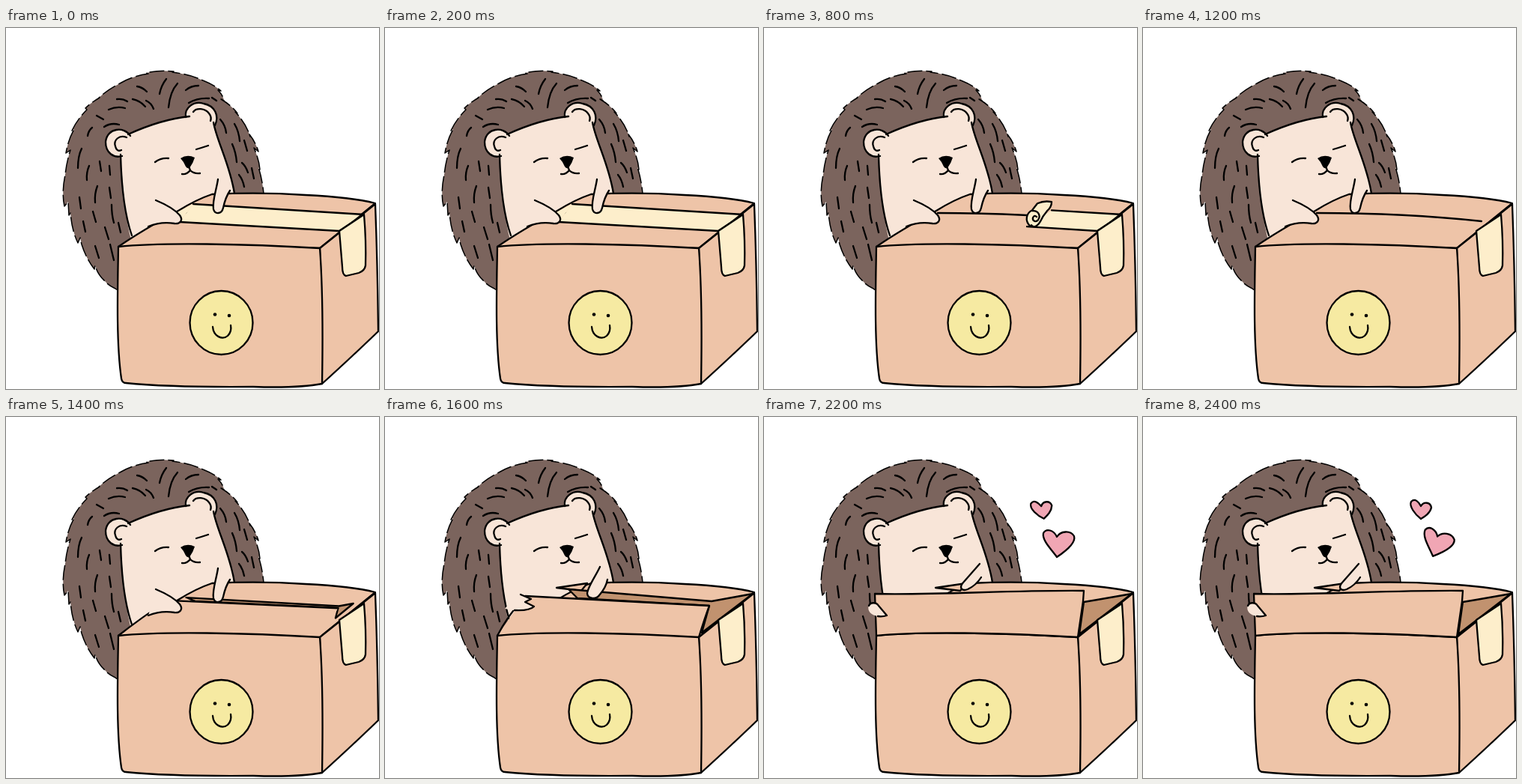
These frames come from a looping animation (498x482 px, 2600 ms). An HTML page:

```html
<!DOCTYPE html>
<html lang="en">
<head>
<meta charset="utf-8">
<title>Hedgehog opens a box</title>
<style>
  html, body { margin: 0; width: 100%; height: 100%; overflow: hidden; background: #fff; }
  svg { display: block; width: 100%; height: 100%; }
  .line { fill: none; stroke: #000; stroke-width: 2.3; stroke-linecap: round; stroke-linejoin: round; }
  .rim { stroke: #000; stroke-width: 1.5; stroke-dasharray: 20 5; stroke-linejoin: round; }
  .fur { fill: #7b645d; }
  .skin { fill: #f8e5d8; }
  .card { fill: #eec4a8; }
  .inside { fill: #c1926f; }
  .tape { fill: #fdeecb; }
  .heart { fill: #f0a6b4; }
  .smile { fill: #f6eaa2; }
</style>
</head>
<body>
<svg viewBox="0 0 498 482" preserveAspectRatio="none">
  <path class="rim fur" d="M152 352L146 348Q137 344 132 338Q122 329 119 317L118 322Q107 308 101 289L99 280L96 287Q88 271 86 247L84 250L83 232L78 238Q74 220 79 196Q81 178 86 163L80 167Q83 149 91 135L88 137Q95 122 108 109L106 107Q113 100 125 93L122 95Q134 83 152 74Q169 64 190 61L187 60Q204 56 224 58L222 59Q246 62 263 70Q278 76 287 84L283 83Q290 90 291 97L287 95Q302 104 309 114L306 112Q321 128 326 145L325 142Q333 152 337 165L331 160Q338 176 339 189L337 186Q342 201 344 221L300 290Z"/>
  <g class="line">
    <path d="M214 68Q207 77 205 88M229 74Q219 85 217 106M175 78Q182 79 188 85M148 95Q156 94 162 98M169 95Q179 97 186 105M187 97Q194 100 197 108M137 109Q148 104 159 107M131 132Q140 126 151 129M240 83Q247 77 257 77M244 100Q256 93 271 94M121 117L130 122M115 133Q110 137 109 144M275 93L281 97"/>
    <path d="M286 122Q293 130 294 140M305 128Q311 138 312 151M302 155Q307 166 308 179M318 150L322 164M315 180Q320 184 323 193M328 187L331 201M311 196Q316 202 318 212M101 161Q96 171 96 187M125 178L127 191M111 184Q107 193 108 203M138 184L139 196M122 211Q118 221 119 233M138 213L140 227M98 226L100 241M141 236Q141 249 144 260M116 245L120 259M103 258L106 272M132 266L137 282M150 260L153 273M119 291L124 307M139 289L144 310"/>
  </g>
  <path class="skin" d="M163 142C187 131 216 121 243 119L276 125C280 150 299 182 304 220L300 245L200 290L168 287C158 250 156 210 153 168Z"/>
  <path class="line skin" d="M166 144C158 131 135 133 133 152C133 167 144 174 155 171"/>
  <path class="line skin" d="M240 119C238 106 251 97 264 101C279 104 285 117 279 130"/>
  <path class="line" d="M161 146C151 142 143 150 146 158C147 163 150 165 154 163M250 112C254 106 266 107 271 114Q275 119 273 124M163 142C187 131 216 121 245 118M153 169C154 210 158 248 168 277M277 126C281 150 299 182 305 221"/>
  <path class="line" d="M199 179Q207 173 217 174M254 162Q261 160 270 157M244 185L246 190M235 195Q241 196 246 190Q251 195 259 194"/>
  <path d="M233 174Q242 168 252 173Q250 180 245 187Q242 188 240 185Q237 178 233 174Z"/>

  <path class="line card" d="M150 292Q182 270 230 244Q254 229 275 222Q340 219 400 223Q462 226 493 234L419 294Z"/>
  <g id="top"></g>
  <path class="line card" d="M419 294Q458 263 493 235Q496 315 497 405Q466 435 422 475Z"/>
  <path class="line card" d="M150 292C205 286 320 288 419 294Q424 360 422 475Q390 481 330 479Q220 480 160 474Q155 474 154 468C147 420 149 350 150 292Z"/>
  <path class="line tape" d="M445 271L478 249Q481 285 480 317Q479 324 471 327L454 331Q449 330 449 319Z"/>
  <g id="flap"></g>
  <ellipse class="line smile" cx="287.5" cy="393.5" rx="42" ry="42.5"/>
  <circle cx="279" cy="382.500" r="2.300"/>
  <circle cx="298" cy="384" r="2.300"/>
  <path class="line" d="M276 399C277 412 289 417 296 411C300 407 301 402 300 397"/>
  <g id="hearts"></g>
</svg>
<script>
const STEP = 200, LOOP = 2600;
const part = id => document.getElementById(id);
const lid = part('top'), flap = part('flap'), hearts = part('hearts');

const shape = (cls, d) => `<path class="${cls}" d="${d}"/>`;
const line = d => shape('line', d);
const lerp = (a, b, k) => a + (b - a) * k;
const between = (a, b, k) => [lerp(a[0], b[0], k), lerp(a[1], b[1], k)];
const poly = (...pts) => 'M' + pts.map(p => p.join(' ')).join('L') + 'Z';

const SEAM = line('M232 247Q350 247 452 258');
const ARMS =
  shape('line skin', 'M200 230C212 235 226 243 232 250C237 257 232 262 225 261Q207 258 190 265') +
  shape('line skin', 'M283 202C281 216 275 232 277 242C279 249 288 249 290 240Q293 226 299 217');
const SLIVER = shape('line card', 'M229 228L270 222L262 232Z');
const TAPE_END = shape('tape', 'M232 259L229 246L251 234Z');

const upper = x => 235 + (x - 250) * 0.062;
const lower = x => 259 + (x - 232) * 0.052;

// Strip of tape lying on the lid, with its left end at x.
function strip(x, lean) {
  const u = x + lean;
  return shape('tape', poly([x, lower(x)], [u, upper(u)], [478, 249], [445, 271])) +
    line(`M${u} ${upper(u)}L478 249L445 271L${x} ${lower(x)}`);
}

function curl(x, tight) {
  const body = tight
    ? 'M4 0C-3 -7 -1 -17 7 -21L14 -30Q23 -34 33 -32Q33 -25 27 -20Q21 -13 18 -6C14 1 9 3 6 -1'
    : 'M7 0C-2 0 -4 -9 3 -14Q9 -16 11 -21Q14 -31 20 -34Q30 -36 38 -31Q30 -28 29 -20Q22 -12 15 -10Q13 -3 7 0';
  const roll = tight
    ? 'M7 -20C15 -21 19 -14 15 -8C12 -4 7 -7 8 -11Q10 -15 13 -12'
    : 'M3 -14C8 -17 14 -14 15 -10';
  return `<g transform="translate(${x} ${lower(x) - 1})">` +
    shape('line tape', body) + line(roll) + '</g>';
}

function taped(step) {
  if (step < 2) return SEAM + TAPE_END + strip(232, 18) + ARMS;
  if (step > 5) return SEAM + ARMS;
  const x = 257 + (step - 2) * 47;
  return SEAM + strip(x, 33) + curl(x, step > 3) + ARMS;
}

// Lid partly lifted: k runs from shut (0) to half open (1).
function lifted(k) {
  const front = [between([232, 248], [187, 239], k), between([449, 257], [433, 252], k)];
  const back = [between([238, 247], [245, 230], k), between([449, 256], [436, 246], k)];
  const corner = between([449, 256], [491, 236], k);
  const low = between([449, 258], [423, 288], k);
  const gap = [back[0][0] + 12, lerp(248, 242, k)];
  return (k === 1 ? SLIVER : '') +
    shape('line inside', poly(back[0], back[1], corner, low, front[1], gap)) +
    shape('card', poly([150, 292], front[0], front[1], [419, 294])) +
    line(`M150 292Q${lerp(190, 162, k)} 268 ${front[0].join(' ')}L${front[1].join(' ')}` +
      (k === 1 ? 'Q427 268 419 294' : ''));
}

const HALF_HANDS =
  shape('line skin', 'M287 200C281 213 270 228 270 236C271 243 282 244 286 238Q295 228 297 217') +
  shape('skin', 'M178 235L195 243L188 247L199 253Q192 260 172 258L160 256Z') +
  line('M181 237L195 243L187 247L199 253Q193 259 173 258');

const OPEN_TOP = SLIVER +
  shape('line inside', 'M427 247L445 244L491 236L421 290Z') +
  shape('line skin', 'M288 196L266 221C260 228 264 233 272 230Q283 225 290 214');
const OPEN_FLAP =
  shape('line card', 'M148 236C230 238 330 231 427 232L426 246L419 294C320 288 205 286 150 292Z') +
  shape('skin', 'M152 266C143 265 137 258 140 252C142 247 150 247 153 252L164 265Z') +
  line('M140 252C142 247 150 247 153 252L164 265Q158 267 152 266');

const BIG = 'M391 187C384 177 371 165 373 155C377 148 387 151 391 160C396 152 409 151 414 159C417 169 400 181 391 187Z';
const SMALL = 'M371 136C363 130 355 119 358 113C363 108 368 113 371 119C375 112 384 114 385 121C383 129 376 133 371 136Z';
const heart = (d, turn, x, y) =>
  `<g transform="rotate(${turn} ${x} ${y})">${shape('line heart', d)}</g>`;

function draw(step) {
  const open = step > 8;
  if (step < 7) lid.innerHTML = taped(step);
  else if (step === 7) lid.innerHTML = lifted(0.35) + ARMS;
  else if (step === 8) lid.innerHTML = lifted(1) + HALF_HANDS;
  else lid.innerHTML = OPEN_TOP;
  flap.innerHTML = open ? OPEN_FLAP : '';

  const tilted = step % 2 === 0;
  hearts.innerHTML = open
    ? heart(BIG, tilted ? 13 : 0, 394, 169) +
      (step > 10 ? heart(SMALL, tilted ? 0 : -12, 371, 123) : '')
    : '';
}

let shown = -1;
function tick(now) {
  const step = Math.floor(now % LOOP / STEP);
  if (step !== shown) draw(shown = step);
  requestAnimationFrame(tick);
}
draw(0);
requestAnimationFrame(tick);
</script>
</body>
</html>
```
